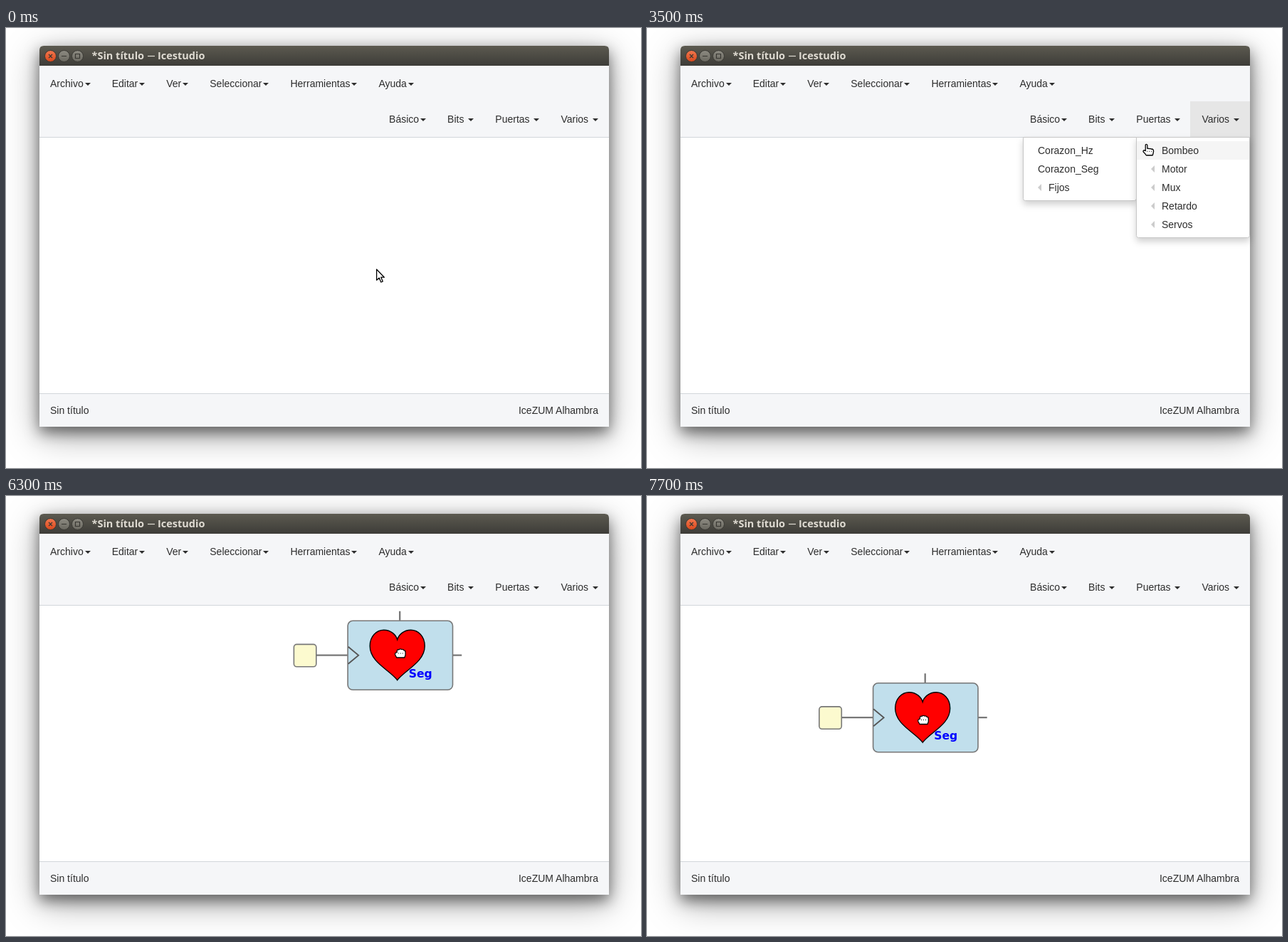
Animation of 892x618 px, one loop 8000 ms. Source, as an HTML page:

```html
<!DOCTYPE html>
<html lang="es">
<head>
<meta charset="utf-8">
<title>Icestudio</title>
<style>
  html, body { margin: 0; width: 100%; height: 100%; overflow: hidden; background: #fff; }
  #frame {
    position: absolute; left: 47px; top: 25px; width: 800px; height: 535px;
    border-radius: 6px 6px 0 0;
    box-shadow: 0 8px 20px rgba(0, 0, 0, .5), 0 12px 50px rgba(0, 0, 0, .35);
  }
  svg { position: absolute; left: 0; top: 0; display: block; }
  text { font: 14px "Liberation Sans", Arial, sans-serif; fill: #2d2d2d; white-space: pre; }
  .title { font: bold 14.5px "Open Sans", "Noto Sans", sans-serif; fill: #dfdbd2; }
  .seg { font: bold 15.6px "DejaVu Sans", sans-serif; fill: #00f; }
  .caret { fill: #2d2d2d; }
  .panel { fill: #fff; stroke: #c6c6c6; filter: drop-shadow(0 5px 5px rgba(0, 0, 0, .18)); }
  .wire { stroke: #777; stroke-width: 2.3; fill: none; }
  .box { stroke: #777; stroke-width: 1.6; }
  .cursor { fill: #fff; stroke: #000; stroke-width: 1.3; stroke-linejoin: round; }
</style>
</head>
<body>
<div id="frame"></div>
<svg width="892" height="618" viewBox="0 0 892 618">
  <defs>
    <linearGradient id="bar" x2="0" y2="1">
      <stop offset="0" stop-color="#5c5a50"/><stop offset="1" stop-color="#3d3c38"/>
    </linearGradient>
    <linearGradient id="red" x2="0" y2="1">
      <stop offset="0" stop-color="#f2784f"/><stop offset="1" stop-color="#d9481c"/>
    </linearGradient>
    <linearGradient id="grey" x2="0" y2="1">
      <stop offset="0" stop-color="#8d8b82"/><stop offset="1" stop-color="#6a6860"/>
    </linearGradient>
    <clipPath id="canvas"><path d="M47 154h800v359h-800z"/></clipPath>
  </defs>

  <path d="M47 53V31q0-6 6-6H841q6 0 6 6V53z" fill="url(#bar)"/>
  <g stroke="#383732">
    <circle cx="62.5" cy="39.5" r="8" fill="url(#red)"/>
    <circle cx="81.5" cy="39.5" r="8" fill="url(#grey)"/>
    <circle cx="100.5" cy="39.5" r="8" fill="url(#grey)"/>
    <path d="M60 37l5 5m0-5l-5 5M78 39.5h7M97.5 36.5h6v6h-6z" fill="none" stroke-width="1.2"/>
  </g>
  <text class="title" x="120.5" y="44">*Sin título</text>
  <path d="M199 39.5h10" stroke="#dfdbd2" stroke-width="1.2"/>
  <text class="title" x="213" y="44">Icestudio</text>

  <path d="M47 53h800v460h-800z" fill="#fff"/>
  <path d="M47 53h800v100h-800zM47 514h800v46h-800z" fill="#f5f6f8"/>
  <path d="M47 153.5h800M47 513.5h800" stroke="#d2d6da"/>
  <path id="active" d="M763 103h84v50h-84z" fill="#e6e6e6"/>
  <g id="nav"></g>
  <text x="62" y="542">Sin título</text>
  <text x="832" y="542" text-anchor="end">IceZUM Alhambra</text>

  <g clip-path="url(#canvas)">
    <g id="block">
      <path class="wire" d="M435 224h44M627 224h12.5M552.5 162v13"/>
      <rect class="box" x="403.7" y="208.7" width="31.4" height="31.4" rx="4" fill="#fcfacf"/>
      <rect class="box" x="479.4" y="175.6" width="147.4" height="97" rx="7" fill="#c1dfec"/>
      <path d="M480 212l14.5 12L480 236" fill="none" stroke="#555" stroke-width="1.8"/>
      <path d="M549 259C539 245 510.5 234 510.5 211C510.5 197 520 188.5 530 188.5C540 188.5 547 195 549 202
               C551 195 558 188.5 568 188.5C578 188.5 587.5 197 587.5 211C587.5 234 559 245 549 259z"
            fill="#f00" stroke="#000" stroke-width="1.4"/>
      <text class="seg" x="565" y="255">Seg</text>
    </g>
  </g>

  <g id="sub"></g>
  <g id="menu"></g>

  <!-- Pointers have their hot spot at 0,0 -->
  <g id="arrow" class="cursor">
    <path d="M.6 1V16.2L4.2 13L6.8 19L9.3 17.9L6.8 12.2H11.4z"/>
  </g>
  <g id="hand" class="cursor">
    <path d="M-1 9.8V2Q-1 .7 .2 .7T1.6 2V6.6Q3 6 4.3 6.9Q5.8 6.3 7 7.3Q9 7 10 8.3Q10.7 10 10 12.5L9 16H0Q-1.5 13.5-3.8 11.5Q-4.8 10-3.8 9.2Q-2.8 8.6-1 9.8z"/>
    <path d="M1 10.5h1m2 0h1m2 0h1" stroke-width="1"/>
  </g>
  <g id="grab" class="cursor">
    <path d="M-5 6.5L-7.2 2.5Q-7.8 -.5 -4.6 -.8V-3Q-4 -5.2 -1.8 -4.6Q0 -6.6 2 -4.9Q4.3 -5.6 5 -3.8Q7.4 -3.6 7.3 -1V3L6 6.5z"/>
    <path d="M-3 .5h1m2 0h1m2 0h1" stroke-width="1"/>
  </g>
</svg>
<script>
const LOOP = 8000, TICK = 100, ROW = 26, TOP = 159, SPLIT = 687, GRID = 12.5;
const $ = id => document.getElementById(id);
const show = (el, on) => { el.style.display = on ? '' : 'none'; };
const place = (el, x, y) => el.setAttribute('transform', `translate(${x} ${y})`);

// Each entry is its text, a gap, a caret and the padding to the next one.
const pen = document.createElement('canvas').getContext('2d');
pen.font = '14px "Liberation Sans", Arial, sans-serif';
const GAP = 2, CARET = 8, PAD = 30;
const span = label => pen.measureText(label).width + GAP + CARET + PAD;
const rowWidth = labels => labels.reduce((sum, label) => sum + span(label), 0);

function buildNav(labels, x, y) {
  for (const label of labels) {
    const end = x + span(label);
    $('nav').innerHTML += `<text x="${x}" y="${y}">${label}</text>` +
      `<path class="caret" d="M${Math.round(end - PAD - CARET)} ${y - 6}h8l-4 4z"/>`;
    x = end;
  }
}
const tools = ['Básico', 'Bits ', 'Puertas ', 'Varios '];
buildNav(['Archivo', 'Editar', 'Ver', 'Seleccionar', 'Herramientas', 'Ayuda'], 62, 83);
buildNav(tools, 832 + PAD - rowWidth(tools), 133);

// Items starting with "<" open a nested list.
function buildMenu(id, x, items) {
  const h = items.length * ROW + 11;
  $(id).innerHTML =
    `<path class="panel" d="M${x + .5} 153.5h159v${h - 3}q0 3-3 3h-153q-3 0-3-3z"/>` +
    items.map((item, i) => {
      const y = TOP + i * ROW, nested = item[0] === '<';
      return `<rect class="row" x="${x + 1}" y="${y}" width="158" height="${ROW}" fill="#f5f5f5"/>` +
        (nested ? `<path class="tip" d="M${x + 26} ${y + 8}v10l-5-5z"/>` : '') +
        `<text x="${x + (nested ? 36 : 21)}" y="${y + 18}">${item.replace('<', '')}</text>`;
    }).join('');
}
buildMenu('sub', 528, ['Corazon_Hz', 'Corazon_Seg', '<Fijos']);
buildMenu('menu', SPLIT, ['<Bombeo', '<Motor', '<Mux', '<Retardo', '<Servos']);

function hover(id, row) {
  $(id).querySelectorAll('.row').forEach((el, i) => show(el, i === row));
  $(id).querySelectorAll('.tip').forEach((el, i) =>
    el.setAttribute('fill', id === 'menu' && i === row ? '#fff' : '#ccc'));
}

// Pointer moves: start, end, x, y reached
const moves = [
  [0, 900, 784, 168],       // up to the toolbar
  [900, 1240, 803, 131],    // onto Varios
  [2000, 2400, 789, 163],   // down to Bombeo
  [2700, 2900, 777, 162],
  [3100, 4050, 579, 164],   // left into the nested list
  [4050, 4400, 577, 190],
  [5600, 5700, 577, 196],
  [5700, 5800, 578, 207],
  [6100, 6850, 440, 284],   // drag the block
  [7000, 7700, 388, 314]
];

function smooth(k) {
  k = Math.min(1, Math.max(0, k));
  return k * k * (3 - 2 * k);
}

const pointer = t => moves.reduce(([x, y], [t0, t1, x1, y1]) => {
  const k = smooth((t - t0) / (t1 - t0));
  return [x + (x1 - x) * k, y + (y1 - y) * k];
}, [520, 338]);

const snap = d => Math.round(d / GRID) * GRID;

function draw(t) {
  const [x, y] = pointer(t);
  const open = t >= 1200 && t < 5800, drag = t >= 5800, inMain = x >= SPLIT;
  const shape = drag ? 'grab' : t >= 1100 && inMain ? 'hand' : 'arrow';
  for (const id of ['arrow', 'hand', 'grab']) show($(id), id === shape);
  place($(shape), x, y);

  show($('active'), open);
  show($('menu'), open);
  show($('sub'), open && t >= 2800);
  const row = Math.floor((y - TOP) / ROW);
  hover('menu', inMain ? row : -1);
  hover('sub', inMain ? -1 : row);

  show($('block'), drag);
  place($('block'), snap(x - 552) + .7, snap(y - 222) - .3);
}

const start = performance.now();
function loop(now) {
  const t = Math.max(0, now - start) % LOOP;
  draw(Math.floor(t / TICK) * TICK);
  requestAnimationFrame(loop);
}
draw(0);
requestAnimationFrame(loop);
</script>
</body>
</html>
```
